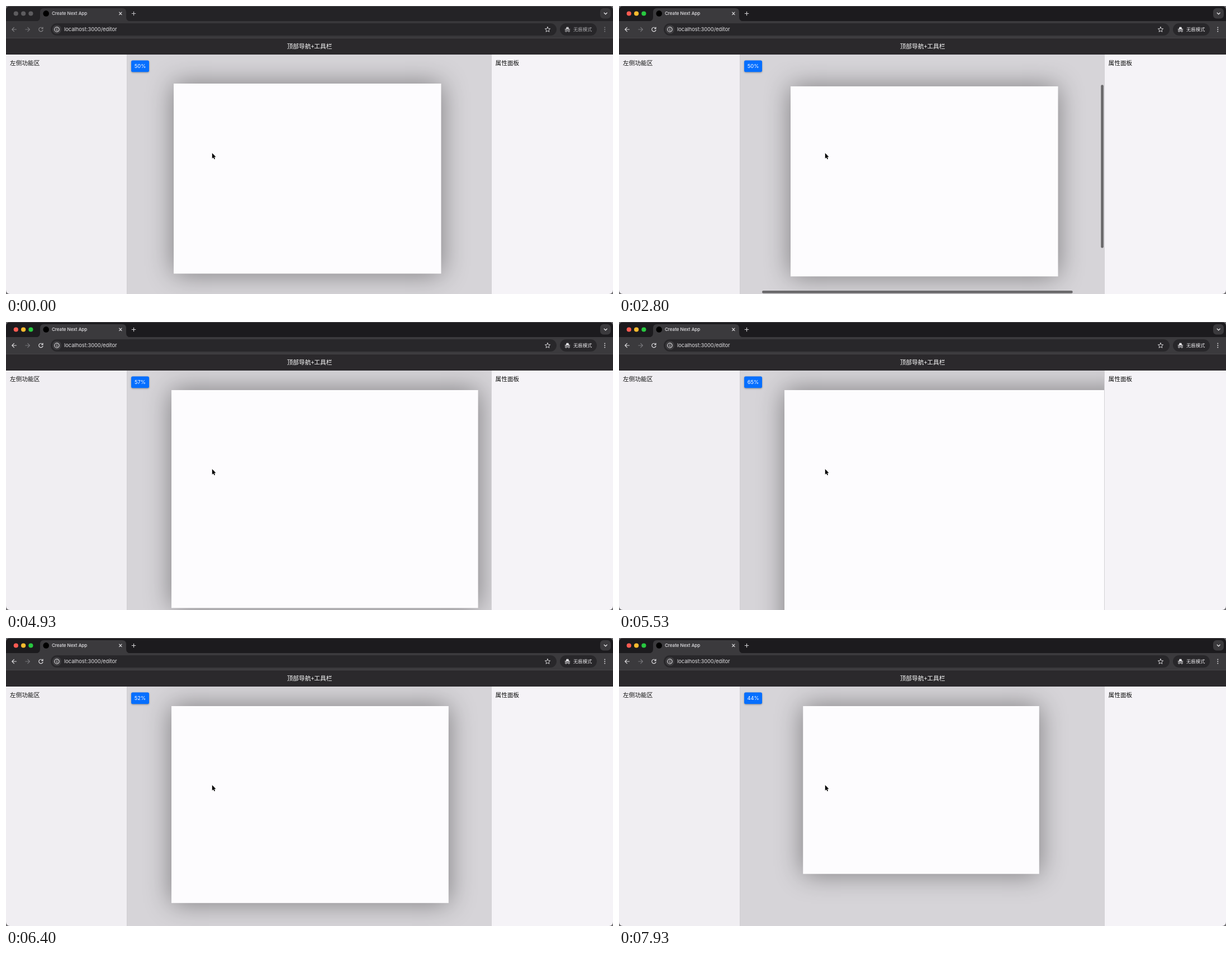
An HTML page with a canvas that plays this animation: 1086 by 516 pixels, repeating every 8 s.

```html
<!DOCTYPE html>
<html lang="zh-CN">
<head>
<meta charset="utf-8">
<title>Editor</title>
<style>
html, body { margin: 0; width: 100%; height: 100%; overflow: hidden; background: #2b292c; }
canvas { display: block; width: 1086px; height: 516px; }
</style>
</head>
<body>
<canvas id="stage" width="1086" height="516"></canvas>
<script>
const W = 1086, H = 516, LOOP = 8000;
const ctx = document.getElementById('stage').getContext('2d');
const LATIN = 'Inter, Roboto, sans-serif';
const CJK = '"Noto Sans CJK SC", "Noto Sans CJK", sans-serif';

const pane = { x: 217, y: 87, w: 651, h: 429 };
const sheet = { w: 957, h: 681, pad: 133 };
const FOCUS = 600, SCROLL_ON = 1930, SCROLL_OFF = 3430, SHRUNK = 7530;

// [time, value]
const ZOOM = [[3670, .5], [4330, .46], [4670, .46], [4930, .573], [5370, .66],
  [6000, .58], [7000, .443], [7530, .424], [7670, .424], [7930, .4415]];
const PAN_X = [[1930, 50], [2350, 38], [2800, 43], [3400, 54]];
const PAN_Y = [[1930, 81], [2350, 62], [2800, 76], [3400, 98]];

function sample(keys, t) {
  if (t <= keys[0][0]) return keys[0][1];
  for (let i = 1; i < keys.length; i++) {
    const [t0, v0] = keys[i - 1], [t1, v1] = keys[i];
    if (t > t1) continue;
    // monotone cubic: slope is zero at turning points
    const slope = k => {
      if (k < 1 || k > keys.length - 2) return 0;
      const a = (keys[k][1] - keys[k - 1][1]) / (keys[k][0] - keys[k - 1][0]);
      const b = (keys[k + 1][1] - keys[k][1]) / (keys[k + 1][0] - keys[k][0]);
      return a * b > 0 ? 2 * a * b / (a + b) : 0;
    };
    const d = t1 - t0, u = (t - t0) / d, u2 = u * u, u3 = u2 * u;
    return v0 * (2 * u3 - 3 * u2 + 1) + v1 * (3 * u2 - 2 * u3)
      + d * (slope(i - 1) * (u3 - 2 * u2 + u) + slope(i) * (u3 - u2));
  }
  return keys[keys.length - 1][1];
}

const clamp01 = v => Math.max(0, Math.min(1, v));
const contentSize = (size, zoom) => size * zoom + 2 * sheet.pad;

function rect(x, y, w, h, fill) {
  ctx.fillStyle = fill;
  ctx.fillRect(x, y, w, h);
}

function round(x, y, w, h, r, fill) {
  ctx.beginPath();
  ctx.roundRect(x, y, w, h, r);
  ctx.fillStyle = fill;
  ctx.fill();
}

function disc(x, y, r, fill) {
  ctx.beginPath();
  ctx.arc(x, y, r, 0, 7);
  ctx.fillStyle = fill;
  ctx.fill();
}

function stroke(d, color, width = 1.2) {
  ctx.strokeStyle = color;
  ctx.lineWidth = width;
  ctx.lineCap = ctx.lineJoin = 'round';
  ctx.stroke(new Path2D(d));
}

function text(str, x, y, font, fill, align = 'left') {
  ctx.font = font;
  ctx.fillStyle = fill;
  ctx.textAlign = align;
  ctx.textBaseline = 'alphabetic';
  ctx.fillText(str, x, y);
}

function drawTabs(active) {
  const strip = active ? '#1c1b1e' : '#242326';
  const tab = active ? '#3b3a3d' : '#38373a';
  rect(0, 0, W, 28, strip);
  rect(0, 0, W, 1, active ? '#4a494c' : '#504f52');
  const lights = active ? ['#ff5b52', '#febb2e', '#28c840'] : Array(3).fill('#5d5c5f');
  lights.forEach((c, i) => disc(17.8 + i * 13.3, 13.5, 4.1, c));

  ctx.fillStyle = tab;
  ctx.fill(new Path2D('M54 27.5Q61 27 61 20V11Q61 4 68 4H208Q215 4 215 11V20Q215 27 222 27.5Z'));
  disc(71.7, 13.4, 5.3, '#000');
  text('Create Next App', 82, 16.3, '500 8px ' + LATIN, active ? '#e6e5e8' : '#dddce0');
  stroke('M202.6 11.2L207 15.6M207 11.2L202.6 15.6', '#e6e5e8', 1.1);
  stroke('M225.2 13.5H231.8M228.5 10.2V16.8', active ? '#d6d5d8' : '#c4c3c6', 1.1);
  round(1063, 4, 19, 18.5, 6, tab);
  stroke('M1070.2 12.2L1072.7 14.7L1075.2 12.2', '#e6e5e8', 1.3);
}

function drawIncognito(color) {
  ctx.fillStyle = color;
  ctx.fill(new Path2D('M1001.6 41.2L1002.6 38Q1003 37.3 1003.8 37.6L1004.5 37.9L1005.2 37.6Q1006 37.3 1006.4 38L1007.4 41.2Z'));
  rect(999.7, 41.2, 9.6, 1, color);
  stroke('M1003.5 44.6A1.5 1.5 0 1 1 1000.5 44.6A1.5 1.5 0 1 1 1003.5 44.6'
    + 'Q1004.5 43.8 1005.5 44.6A1.5 1.5 0 1 1 1008.5 44.6A1.5 1.5 0 1 1 1005.5 44.6', color, 1);
}

function drawToolbar(active) {
  const icon = active ? '#dcdbde' : '#828184';
  const field = active ? '#28272a' : '#272629';
  rect(0, 27, W, 31, active ? '#3b3a3d' : '#38373a');
  rect(0, 57, W, 1, '#454447');
  stroke('M18.4 42H11M14.4 38.4L10.8 42L14.4 45.6', icon);
  stroke('M34.8 42H42.2M38.8 38.4L42.4 42L38.8 45.6', active ? '#77767a' : '#737276');
  stroke('M65.3 39.6A3.7 3.7 0 1 0 66 43M66 38.2V40.6H63.5', icon);

  round(80, 31, 905, 22, 11, field);
  disc(91, 42, 8, '#3d3c3f');
  stroke('M95.2 42A4.2 4.2 0 1 1 86.8 42A4.2 4.2 0 1 1 95.2 42M91 42V44', '#e0dfe2', 1.1);
  disc(91, 39.9, .7, '#e0dfe2');
  text('localhost:3000/editor', 104, 45.3, '9.3px ' + LATIN, '#e4e3e6');

  let star = '';
  for (let i = 0; i < 10; i++) {
    const r = i % 2 ? 2.2 : 4.9, a = i * Math.PI / 5;
    star += (i ? 'L' : 'M') + (969 + r * Math.sin(a)) + ' ' + (42.3 - r * Math.cos(a));
  }
  stroke(star + 'Z', '#d0cfd2', 1);

  round(991, 31, 66, 22, 11, field);
  drawIncognito(active ? '#e6e5e8' : '#c6c5c8');
  text('无痕模式', 1015, 45.2, '500 8.4px ' + CJK, active ? '#e6e5e8' : '#a9a8ab');
  for (const dy of [-3.5, 0, 3.5]) disc(1071.3, 42 + dy, .95, icon);
}

function drawPanels() {
  rect(0, 58, W, 29, '#2b292c');
  text('顶部导航+工具栏', 543, 76.3, '10.7px ' + CJK, '#fff', 'center');
  rect(0, 87, 217, 429, '#f0eef2');
  rect(868, 87, 218, 429, '#f5f3f7');
  rect(216, 87, 1, 429, '#cfcdd1');
  rect(868, 87, 1, 429, '#d3d1d5');
  text('左侧功能区', 7, 105.6, '10.7px ' + CJK, '#111');
  text('属性面板', 875.5, 105.6, '10.7px ' + CJK, '#111');
}

function drawScrollbars(sx, sy, zoom, alpha) {
  const bar = (size, full, scroll) => {
    const track = size - 15.5;
    return [2.3 + scroll / full * track, size / full * track];
  };
  const [hx, hw] = bar(pane.w, contentSize(sheet.w, zoom), sx);
  const [vy, vh] = bar(pane.h, contentSize(sheet.h, zoom), sy);
  ctx.globalAlpha = alpha;
  round(pane.x + hx, 510, hw, 4.7, 2.3, '#6a696b');
  round(862.2, pane.y + vy, 4.7, vh, 2.3, '#6a696b');
  ctx.globalAlpha = 1;
}

function drawPane(t) {
  const zoom = sample(ZOOM, t);
  // shrinking content pushes the scroll offset back and it stays there
  const reach = contentSize(sheet.w, sample(ZOOM, Math.min(t, SHRUNK))) - pane.w;
  const sx = Math.min(sample(PAN_X, t), reach);
  const sy = sample(PAN_Y, t);

  ctx.save();
  ctx.beginPath();
  ctx.rect(pane.x, pane.y, pane.w, pane.h);
  ctx.clip();
  rect(pane.x, pane.y, pane.w, pane.h, '#d6d4d8');

  ctx.shadowColor = 'rgba(0,0,0,.42)';
  ctx.shadowBlur = 44;
  rect(pane.x + sheet.pad - sx, pane.y + sheet.pad - sy, sheet.w * zoom, sheet.h * zoom, '#fdfcfe');
  ctx.shadowColor = 'transparent';

  const alpha = clamp01((t - SCROLL_ON) / 70) * clamp01(1 - (t - SCROLL_OFF) / 200);
  if (alpha > 0) drawScrollbars(sx, sy, zoom, alpha);

  ctx.shadowColor = 'rgba(0,0,0,.35)';
  ctx.shadowBlur = 3;
  ctx.shadowOffsetY = 1;
  round(224, 97.5, 32, 20.7, 2.7, '#066fff');
  ctx.restore();
  text(Math.round(zoom * 100) + '%', 240, 111.3, '9.3px ' + LATIN, '#fff', 'center');
}

function drawCorners() {
  const r = 7;
  ctx.beginPath();
  ctx.rect(0, 0, W, H);
  ctx.roundRect(0, 0, W, H, r);
  ctx.fillStyle = '#6f6e71';
  ctx.fill('evenodd');
}

function drawCursor(x, y) {
  const arrow = new Path2D('M0 0V9.6L2.2 7.6L3.7 11L5.3 10.3L3.8 7H6.7Z');
  ctx.save();
  ctx.translate(x, y);
  ctx.lineJoin = 'round';
  ctx.lineWidth = 1.6;
  ctx.strokeStyle = '#fff';
  ctx.stroke(arrow);
  ctx.fillStyle = '#000';
  ctx.fill(arrow);
  ctx.restore();
}

function draw(t) {
  const active = t >= FOCUS;
  drawTabs(active);
  drawToolbar(active);
  drawPanels();
  drawPane(t);
  drawCorners();
  drawCursor(368.8, 263.6);
}

const start = performance.now();
function frame() {
  draw((performance.now() - start) % LOOP);
  requestAnimationFrame(frame);
}
frame();
</script>
</body>
</html>
```
